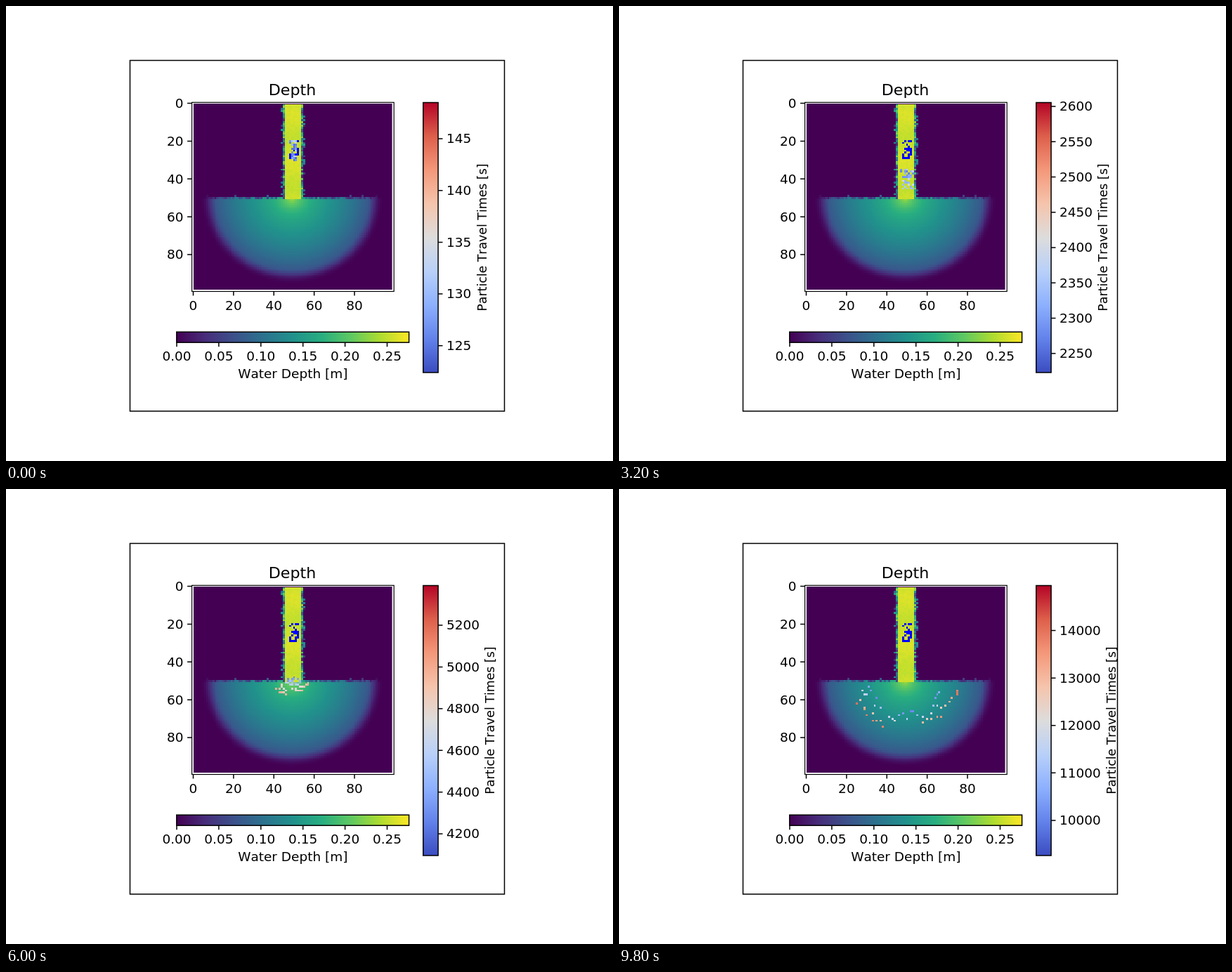
An HTML page with a canvas for the animation above (10 s loop, 864 by 648 pixels).

```html
<!DOCTYPE html>
<html lang="en">
<head>
<meta charset="utf-8">
<title>Depth</title>
<style>
  html, body { margin: 0; width: 100%; height: 100%; overflow: hidden; background: #fff; }
  canvas, svg { position: absolute; display: block; }
  canvas {
    left: 265.1px; top: 137.2px; width: 286.9px; height: 269.4px; image-rendering: pixelated;
    background: linear-gradient(#440154, #440154) 1.7px 1.6px / 282.6px 265px no-repeat;
  }
  svg { left: 0; top: 0; }
  text { font: 17.35px "DejaVu Sans", sans-serif; font-kerning: none; fill: #000; }
  .title { font-size: 20.8px; }
  path, rect { stroke: #000; stroke-width: 1.5; }
  path { fill: none; }
</style>
</head>
<body>
<canvas id="field" width="100" height="100"></canvas>
<svg width="864" height="648" viewBox="0 0 864 648">
  <defs>
    <linearGradient id="depth"></linearGradient>
    <linearGradient id="time" x1="0" y1="1" x2="0" y2="0"></linearGradient>
    <clipPath id="inside"><path d="M176 77H709.5V577H176Z"/></clipPath>
  </defs>
  <g id="fixed"></g>
  <g id="scale" clip-path="url(#inside)"></g>
</svg>
<script>
const STEP = 200, STEPS = 50;
const $ = id => document.getElementById(id);

const palette = s => s.split(' ').map(h => [0, 2, 4].map(i => parseInt(h.slice(i, i + 2), 16)));
const VIRIDIS = palette('440154 472d7b 3b528b 2c728e 21918c 28ae80 5ec962 addc30 fde725');
const COOLWARM = palette('3b4cc0 6282ea 8db0fe b8d0f9 dddcdc f5c4ac f4987a dd5f4b b40426');

const clamp = (v, a = 0, b = 1) => Math.min(b, Math.max(a, v));
const mix = (a, b, t) => a + (b - a) * t;
const smooth = t => { t = clamp(t); return t * t * (3 - 2 * t); };
const rand = (a, b = 0) => {
  const v = Math.sin(a * 127.1 + b * 311.7) * 43758.5453;
  return v - Math.floor(v);
};

function shade(stops, t) {
  const f = clamp(t) * (stops.length - 1), i = Math.min(Math.floor(f), stops.length - 2);
  return stops[i].map((c, j) => Math.round(mix(c, stops[i + 1][j], f - i)));
}

// Water depth: a channel that opens into a half-round basin
const DEPTH_MAX = 0.2765;

const basin = r =>
  (.18 * Math.sqrt(Math.max(0, 1 - r / 46)) + .065 * Math.exp(-r / 5)) * smooth((45.3 - r) / 8);

function depth(x, y) {
  const n = rand(x, y), fan = basin(Math.hypot(x - 49, y - 50));
  if (y > 50) return fan;
  if (x > 45 && x < 54) return .253 + .005 * Math.sin(y * .25) + .006 * n;
  if (y === 50) return fan * (.25 + .75 * n);
  if (x === 45 || x === 54) return .03 + .2 * n;
  if (x === 44 || x === 55) return n > .75 ? .16 * rand(y, x) : 0;
  return y === 49 && n > .93 ? fan * .5 : 0;
}

const ctx = $('field').getContext('2d');
const base = ctx.createImageData(100, 100);
function put(img, x, y, rgb) {
  img.data.set([...rgb, 255], (y * 100 + x) * 4);
}
for (let y = 1; y < 99; y++)
  for (let x = 1; x < 99; x++) {
    const seeded = x >= 48 && x <= 52 && y >= 20 && y < 30 && rand(x + 3, y) < .56;
    put(base, x, y, seeded ? [0, 0, 255] : shade(VIRIDIS, depth(x, y) / DEPTH_MAX));
  }

// Particles drift down the channel, then fan out; lead is 0 for the slowest and 1 for the fastest
const COUNT = 46, SPEED = .96;
const particles = Array.from({ length: COUNT }, (_, i) => {
  const u = (2 * i + 1) / COUNT - 1, lead = rand(i, 4);
  return {
    lead, turn: 1.42 * Math.sign(u) * Math.abs(u) ** .8,
    reach: 16 + 11.5 * lead,
    lane: mix(u, 2 * rand(i, 7) - 1, .6),
    tint: .08 + .4 * rand(i, 9) ** 2
  };
});

function place(p, k) {
  const d = p.reach - SPEED * (STEPS - 1 - k);
  const lane = p.lane * (2 + 1.6 * clamp(k / 10));
  if (d < 0) return [49.8 + lane, Math.max(20, 50 + d)];
  return [49 + d * Math.sin(p.turn) + (lane + .8) * clamp(1 - d / 8),
          50 + Math.max(d * Math.cos(p.turn), clamp(d - 1))];
}

function drawField(k) {
  const img = new ImageData(new Uint8ClampedArray(base.data), 100, 100);
  const late = clamp((k - 10) / 25);
  for (const p of particles) {
    const [x, y] = place(p, k).map(Math.round);
    put(img, x, y, shade(COOLWARM, mix(p.tint, .1 + .78 * p.lead, late)));
  }
  ctx.putImageData(img, 0, 0);
}

// Key points of the travel time limits: step, lowest, highest
const LIMITS = [[0, 122.4, 148.5], [11, 1574, 1887], [21, 2876, 3398], [30, 4096, 5390],
                [35, 4904, 7278], [43, 6935, 11465], [49, 9260, 14947]];

function limit(k, c) {
  const last = LIMITS.length - 1;
  const slope = i => {
    const a = LIMITS[Math.max(0, i - 1)], b = LIMITS[Math.min(last, i + 1)];
    return (b[c] - a[c]) / (b[0] - a[0]);
  };
  let i = 0;
  while (i < last - 1 && k >= LIMITS[i + 1][0]) i++;
  const a = LIMITS[i], b = LIMITS[i + 1], h = b[0] - a[0], t = (k - a[0]) / h, u = 1 - t;
  return u * u * ((1 + 2 * t) * a[c] + t * h * slope(i))
       + t * t * ((3 - 2 * t) * b[c] - u * h * slope(i + 1));
}

function tickStep(range) {
  const raw = range / 9, mag = 10 ** Math.floor(Math.log10(raw));
  return mag * [1, 2, 2.5, 5, 10].find(s => s * mag >= raw);
}

// The whole figure is a little wider than tall
const label = (x, y, s, anchor = 'middle', more = '', cls = '') =>
  `<text class="${cls}" text-anchor="${anchor}" transform="translate(${x} ${y}) scale(1.066 1) ${more}">${s}</text>`;
const line = d => `<path d="${d}"/>`;
const box = (x, y, w, h, fill = 'none', sw = 1.5) =>
  `<rect x="${x}" y="${y}" width="${w}" height="${h}" fill="${fill}" style="stroke-width:${sw}"/>`;

function drawScale(k) {
  const lo = limit(k, 1), hi = limit(k, 2), step = tickStep(hi - lo);
  let out = '', digits = 0;
  for (let v = Math.ceil(lo / step) * step; v <= hi; v += step) {
    const y = 522 - (v - lo) / (hi - lo) * 384.5, s = String(Math.round(v));
    digits = Math.max(digits, s.length);
    out += line(`M615 ${y}h6.5`) + label(627, y + 6.4, s, 'start');
  }
  out += label(683.5 + 11.9 * (digits - 3), 329.6, 'Particle Travel Times [s]', 'middle', 'rotate(-90)');
  $('scale').innerHTML = out;
}

function drawFixed() {
  for (const [id, stops] of [['depth', VIRIDIS], ['time', COOLWARM]])
    $(id).innerHTML = stops.map((c, i) => `<stop offset="${i / 8}" stop-color="rgb(${c})"/>`).join('');
  let out = box(176.5, 77.5, 533, 499.5) + box(264.6, 137.3, 287.6, 269.2, 'none', 1.2)
    + box(242.8, 464.2, 330.8, 15, 'url(#depth)') + box(593.8, 137.5, 21.3, 384.5, 'url(#time)')
    + label(407.5, 126.6, 'Depth', 'middle', '', 'title')
    + label(408.3, 530, 'Water Depth [m]');
  for (let v = 0; v <= 80; v += 20) {
    const x = 266.5 + v * 2.869, y = 138.5 + v * 2.694;
    out += line(`M${x} 406.5v6.1M264.6 ${y}h-6.5`)
      + label(x, 432.6, v) + label(252.6, y + 6.4, v, 'end');
  }
  for (let i = 0; i < 6; i++) {
    const x = 243 + i * 59.9;
    out += line(`M${x} 479.2v6.1`) + label(x, 505.4, (i * .05).toFixed(2));
  }
  $('fixed').innerHTML = out;
}

let shown = -1;
const start = performance.now();
function tick() {
  const k = Math.floor((performance.now() - start) / STEP) % STEPS;
  if (k !== shown) {
    shown = k;
    drawField(k);
    drawScale(k);
  }
  requestAnimationFrame(tick);
}
drawFixed();
tick();
</script>
</body>
</html>
```
